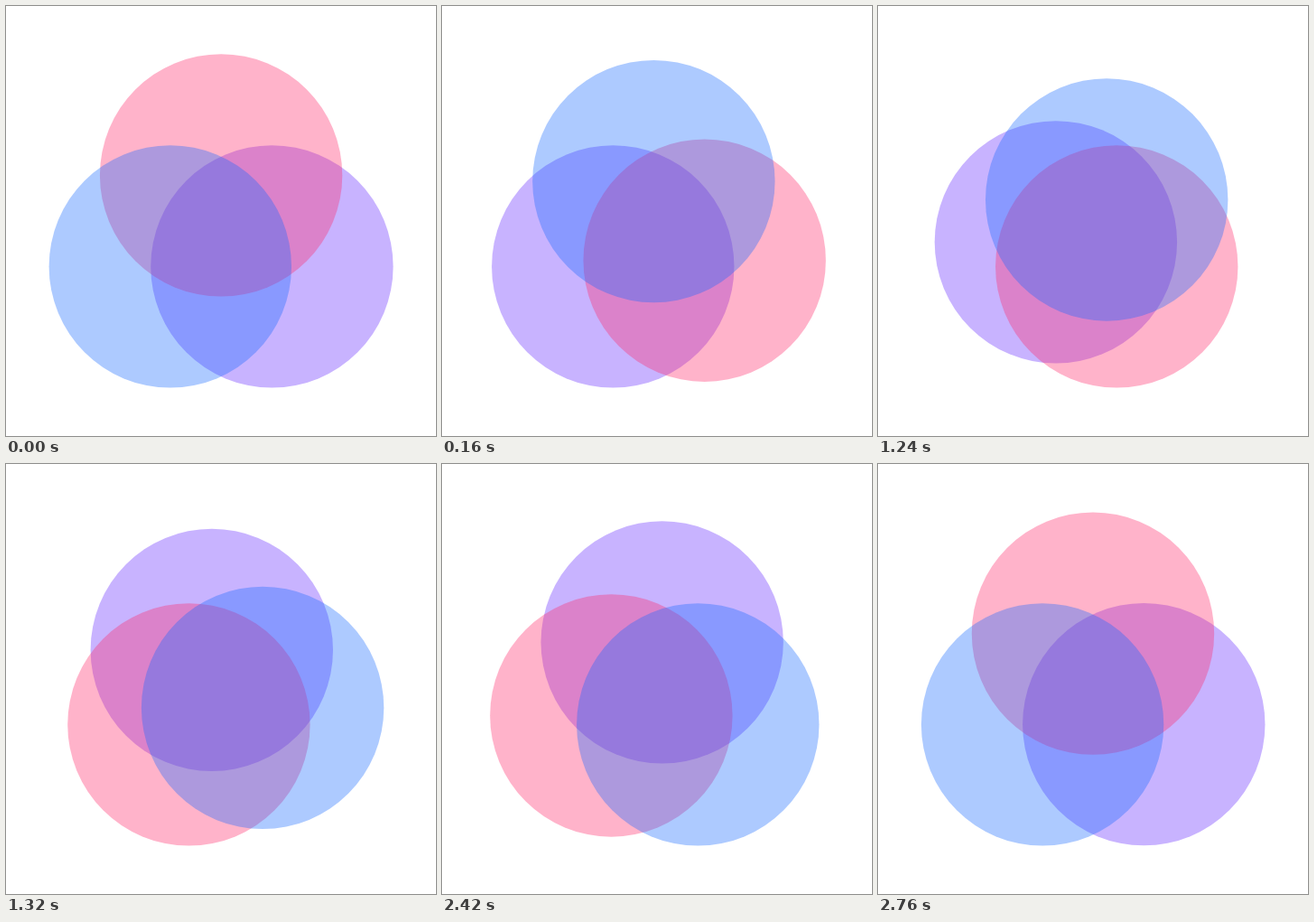
An HTML page that plays this animation: 476 px wide and 476 px high, repeating every 3580 ms.

```html
<!DOCTYPE html>
<html lang="en">
<head>
<meta charset="utf-8">
<title>Turning circles</title>
<style>
html, body { margin: 0; height: 100%; overflow: hidden; background: #fff; }
svg { display: block; width: 100vw; height: 100vh; }
</style>
</head>
<body>
<svg viewBox="0 0 476 476" fill-opacity=".35">
  <circle r="134.2" fill="rgb(98,38,255)"/>
  <circle r="134.2" fill="rgb(255,38,104)"/>
  <circle r="134.2" fill="rgb(20,105,255)"/>
</svg>
<script>
const LOOP = 3580, TICK = 20, GLIDE = 400;
const starts = [3.4, 1222, 2414];               // when each move begins
const spots = [[238.1, 187.4], [294.4, 288.4], [181.8, 288.4]]; // top, right, left
const homes = [1, 0, 2];                        // first spot of each circle
const circles = document.querySelectorAll('circle');

const easeOutExpo = p => p <= 0 ? 0 : p >= 0.9 ? 1 : 1 - 2 ** (-10 * p);

function draw(now) {
  const t = Math.floor((now % LOOP) / TICK) * TICK;
  const turn = starts.reduce((sum, s) => sum + easeOutExpo((t - s) / GLIDE), 0);
  const step = Math.floor(turn), part = turn - step;
  circles.forEach((c, i) => {
    const from = spots[(homes[i] + step) % 3];
    const to = spots[(homes[i] + step + 1) % 3];
    c.setAttribute('cx', from[0] + (to[0] - from[0]) * part);
    c.setAttribute('cy', from[1] + (to[1] - from[1]) * part);
  });
}

let begin;
function frame(now) {
  begin ??= now;
  draw(now - begin);
  requestAnimationFrame(frame);
}
draw(0);
requestAnimationFrame(frame);
</script>
</body>
</html>
```
